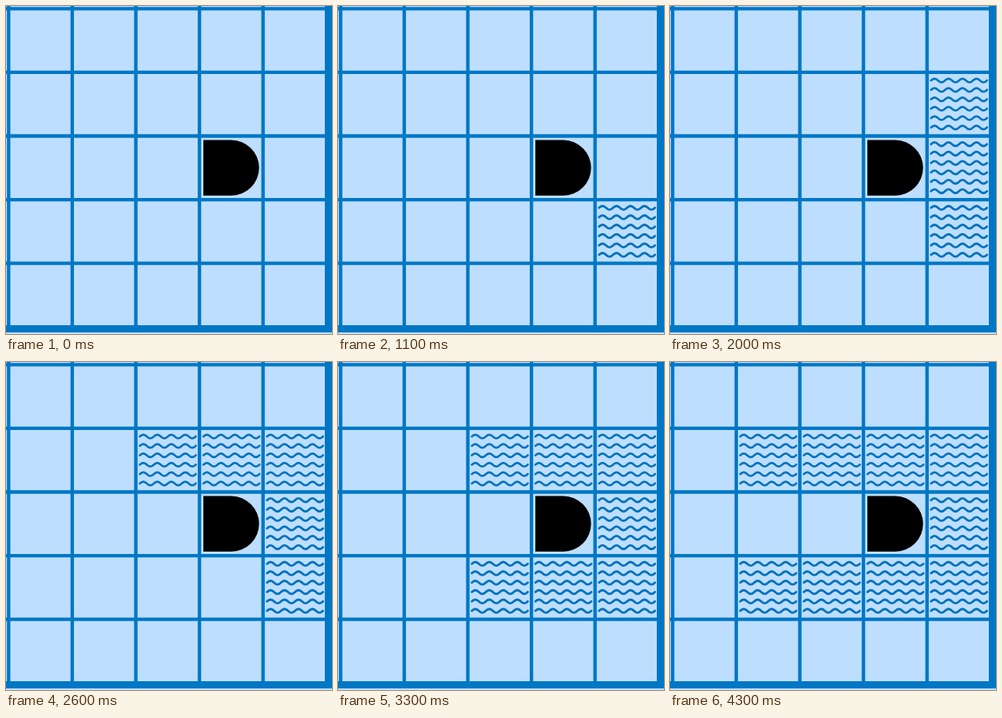
Write an HTML page that moves like this. It is 408 px wide and 410 px high and loops after 4400 ms.

```html
<!DOCTYPE html>
<html lang="en">
<head>
<meta charset="utf-8">
<title>Water grid</title>
<style>
  html, body { margin: 0; width: 100%; height: 100%; overflow: hidden; background: #bddeff; }
  svg { display: block; width: 408px; height: 410px; }
</style>
</head>
<body>
<svg viewBox="0 0 408 410">
  <rect width="408" height="410" fill="#bddeff"/>
  <g id="grid" fill="none" stroke="#0077c5" stroke-width="4.3"></g>
  <path d="M399 0H408V408H0V399H399Z" fill="#0077c5"/>
  <path d="M247 167.5H282A34.75 34.75 0 0 1 282 237H247Z"/>
  <g id="water" fill="none" stroke="#0072bc" stroke-width="2.8" stroke-linecap="round"></g>
</svg>
<script>
const LOOP = 4400;
const PITCH = 79.6;
const ORIGIN = 3.3;
const WAVE_WIDTH = 70;
const HALF_WAVES = 8;

// column, row, time at which the cell fills with water
const fills = [
  [4, 3, 100],
  [4, 2, 1500],
  [4, 1, 1800],
  [3, 1, 2200],
  [2, 1, 2500],
  [3, 3, 2900],
  [2, 3, 3300],
  [1, 3, 3600],
  [1, 1, 4000]
];

function addPath(parent, d) {
  const path = document.createElementNS("http://www.w3.org/2000/svg", "path");
  path.setAttribute("d", d);
  parent.append(path);
  return path;
}

const grid = document.getElementById("grid");
const water = document.getElementById("water");

for (let i = 0; i < 5; i++) {
  const p = ORIGIN + i * PITCH;
  addPath(grid, `M${p} 0V404M0 ${p}H404`);
}

function wavesAt(col, row) {
  const x = ORIGIN + col * PITCH + 5;
  const y = ORIGIN + row * PITCH + 10.2;
  const step = WAVE_WIDTH / HALF_WAVES;
  let d = "";
  for (let i = 0; i < 6; i++) {
    d += `M${x} ${y + i * 11.75}q${step / 2} -4.6 ${step} 0`;
    d += `t${step} 0`.repeat(HALF_WAVES - 1);
  }
  return d;
}

const start = document.timeline.currentTime ?? 0;
for (const [col, row, time] of fills) {
  const animation = addPath(water, wavesAt(col, row)).animate(
    [
      { opacity: 0, offset: 0, easing: "step-end" },
      { opacity: 1, offset: time / LOOP, easing: "step-end" },
      { opacity: 1, offset: 1 }
    ],
    { duration: LOOP, iterations: Infinity }
  );
  animation.startTime = start;
}
</script>
</body>
</html>
```
